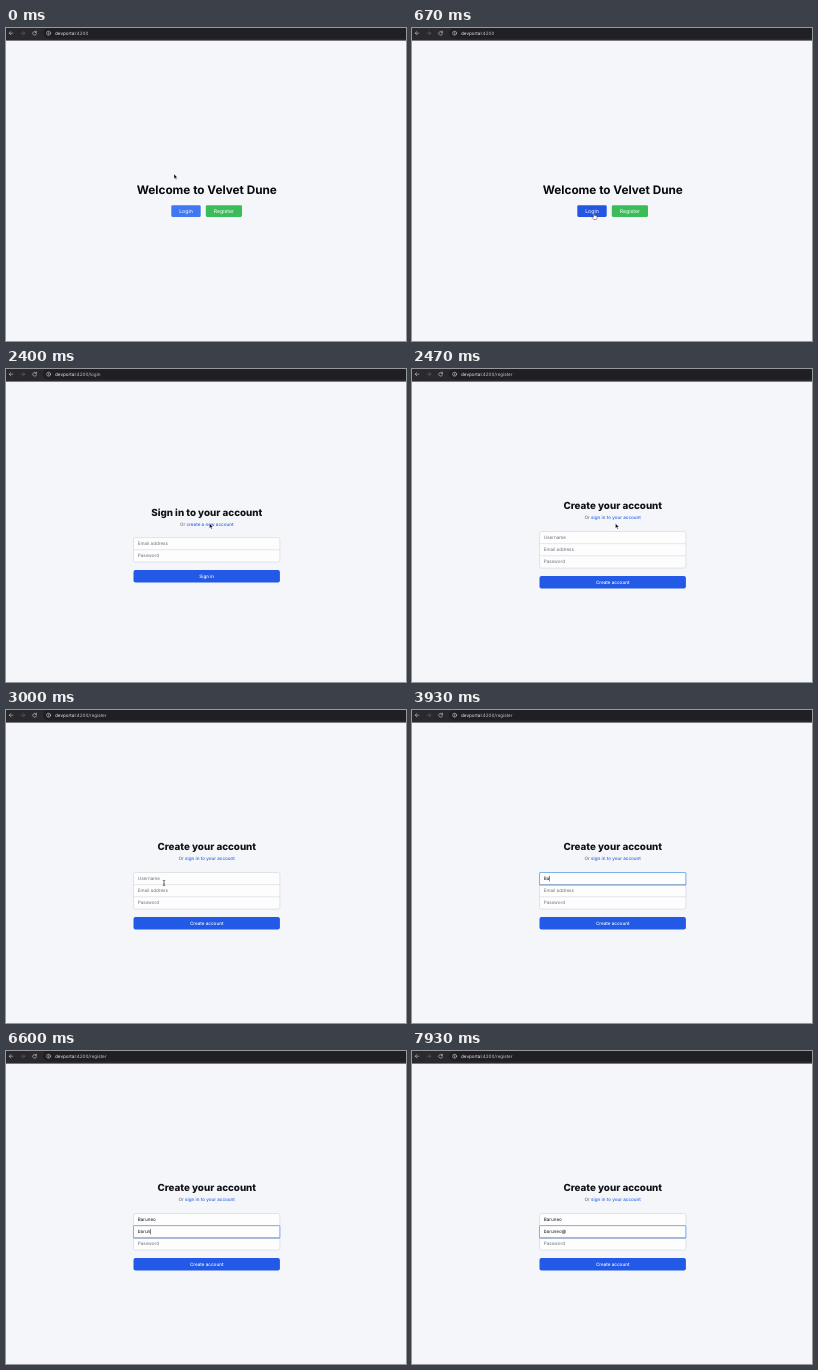
An HTML page for the animation above (8 s loop, 400 px wide and 313 px high).

```html
<!DOCTYPE html>
<html lang="en">
<head>
<meta charset="utf-8">
<title>Sign up flow</title>
<style>
html, body { margin: 0; width: 100%; height: 100%; overflow: hidden; background: #f4f6fa; }
svg { display: block; width: 100%; height: 100%; }
text { font-family: Inter, "Open Sans", sans-serif; font-size: 4.58px; text-rendering: geometricPrecision; }
.mid { text-anchor: middle; }
.hero { font-size: 11.77px; font-weight: 700; fill: #08090c; }
.title { font-size: 9.81px; font-weight: 800; fill: #111216; }
.note { fill: #4b5563; }
.link { fill: #2b62e6; font-weight: 500; }
.label { fill: #fff; font-weight: 500; }
.big { font-size: 5.23px; font-weight: 400; }
.hint { fill: #6b7077; }
.typed { fill: #111318; }
.icon { fill: none; stroke-width: .6; stroke-linecap: round; stroke-linejoin: round; }
</style>
</head>
<body>
<svg id="stage" viewBox="0 0 400 313" preserveAspectRatio="none">
  <rect width="400" height="313" fill="#f4f6fa"/>
  <g id="home"></g>
  <g id="login"></g>
  <g id="register"></g>
  <g id="bar">
    <rect width="400" height="12.6" fill="#2a292e"/>
    <rect x="37" y="-.6" width="380" height="11.2" rx="5.6" fill="#201f24"/>
    <path class="icon" stroke="#c9c9cd" d="M6.9 5.2H3.2M4.9 3.5L3.2 5.2L4.9 6.9"/>
    <path class="icon" stroke="#67676c" d="M15.1 5.2H18.8M17.1 3.5L18.8 5.2L17.1 6.9"/>
    <path class="icon" stroke="#c9c9cd" d="M30.2 4.2A1.9 1.9 0 1 0 30.5 5.7M30.4 3.1V4.4H29.1"/>
    <circle class="icon" cx="42.6" cy="5.2" r="2" stroke="#c9c9cd"/>
    <path class="icon" stroke="#c9c9cd" d="M42.6 5.1V6.2M42.6 4.1V4.2"/>
    <text x="49" y="6.9" fill="#f1f1f3">devportal<tspan id="path" fill="#c4c4c9"></tspan></text>
  </g>
  <g id="cursor">
    <path id="arrow" d="M0 0V4.8L1.15 3.75L1.95 5.6L2.75 5.25L1.95 3.45H3.5Z" fill="#080808" stroke="#fff" stroke-width=".35"/>
    <path id="hand" d="M-.6 .3Q0 -.5 .5 .3V2Q1.2 1.6 1.5 2.2Q2.2 1.9 2.5 2.5Q3.2 2.5 3.1 3.4Q3.1 4.9 2.3 6H-.3Q-1 4.9 -2 3.7Q-1.9 2.8 -.6 3.6Z" fill="#fff" stroke="#111" stroke-width=".4"/>
    <path id="beam" d="M-1.2 -2.6Q0 -2.6 0 -2Q0 -2.6 1.2 -2.6M0 -2V2M-1.2 2.6Q0 2.6 0 2Q0 2.6 1.2 2.6M-.6 .9H.6" fill="none" stroke="#222" stroke-width=".6"/>
  </g>
</svg>
<script>
const LOOP = 8000, CX = 200.75, LEFT = 127.5, WIDE = 146.4, ROW = 12.1, PAD = 131.75;
const $ = id => document.getElementById(id);

function add(parent, tag, attrs, content) {
  const el = document.createElementNS("http://www.w3.org/2000/svg", tag);
  for (const k in attrs) el.setAttribute(k, attrs[k]);
  if (content) el.textContent = content;
  parent.append(el);
  return el;
}
const show = (el, on) => el.setAttribute("visibility", on ? "visible" : "hidden");

function button(parent, x, y, w, h, r, fill, label, cls) {
  const box = add(parent, "rect", { x, y, width: w, height: h, rx: r, fill });
  add(parent, "text", { x: x + w / 2, y: y + h / 2 + (cls ? 1.9 : 1.65), class: "mid label " + (cls || "") }, label);
  return box;
}

function form(parent, top, title, link, hints, action) {
  add(parent, "text", { x: CX, y: top, class: "mid title" }, title);
  const note = add(parent, "text", { x: CX, y: top + 10, class: "mid note" }, "Or ");
  add(note, "tspan", { class: "link" }, link);
  const y0 = top + 22.1, h = hints.length * ROW + .3;
  add(parent, "rect", { x: LEFT, y: y0, width: WIDE, height: h, rx: 2, fill: "#fefdfe", stroke: "#cdd0d7", "stroke-width": .55 });
  const rows = hints.map((text, i) => {
    const y = y0 + i * ROW;
    if (i) add(parent, "path", { d: `M${LEFT} ${y + .1}h${WIDE}`, stroke: "#cdd0d7", "stroke-width": .55 });
    return { y, hint: add(parent, "text", { x: PAD, y: y + 7.75, class: "hint" }, text) };
  });
  button(parent, LEFT, y0 + h + 7.95, WIDE, 12.4, 2, "#2259e6", action);
  return rows;
}

const home = $("home"), login = $("login"), register = $("register");
add(home, "text", { x: CX, y: 166.3, class: "mid hero" }, "Welcome to Velvet Dune");
const loginBtn = button(home, 165.3, 177.3, 29.4, 11.6, 1.3, "#3f78f2", "Login", "big");
const joinBtn = button(home, 199.8, 177.3, 36.2, 11.6, 1.3, "#3abc59", "Register", "big");
form(login, 146.5, "Sign in to your account", "create a new account", ["Email address", "Password"], "Sign in");
const rows = form(register, 140.4, "Create your account", "sign in to your account",
  ["Username", "Email address", "Password"], "Create account");

const ring = add(register, "g", {});
add(ring, "rect", { x: LEFT, y: 0, width: WIDE, height: 12.4, rx: .6, fill: "none", stroke: "#5f9fee", "stroke-width": .75 });
add(ring, "path", { d: `M${LEFT} 12.4h${WIDE}`, stroke: "#8190a6", "stroke-width": .7 });
const caret = add(register, "rect", { width: .5, height: 5.4, fill: "#111" });

// Each field: text, focus start and end, time of each key
const fields = [
  { text: "Baruneo", from: 3200, to: 5000, keys: [3670, 3930, 4130, 4330, 4530, 4730, 4870] },
  { text: "baruneo@", from: 5000, to: 8000, keys: [5670, 5770, 5870, 6070, 6270, 6670, 6900, 7730] }
];
fields.forEach((f, i) => {
  f.row = rows[i];
  f.out = add(register, "text", { x: PAD, y: f.row.y + 7.75, class: "typed" });
});

// Pointer stops: time, x, y
const stops = [
  [70, 168, 146], [200, 142, 163], [330, 178, 183], [430, 210, 184], [600, 182, 185.5],
  [930, 182, 185.5], [1330, 192, 199], [1470, 192, 199], [1730, 208, 206], [2200, 203.5, 154.5],
  [2600, 203.5, 154.5], [3000, 158, 173], [3200, 156, 169]
];
function pointer(t) {
  let a = stops[0];
  for (const b of stops) {
    if (t < b[0]) {
      if (t <= a[0]) return [a[1], a[2]];
      const u = (t - a[0]) / (b[0] - a[0]), e = u * u * (3 - 2 * u);
      return [a[1] + (b[1] - a[1]) * e, a[2] + (b[2] - a[2]) * e];
    }
    a = b;
  }
  return [a[1], a[2]];
}
const inside = (x, y, l, t, r, b) => x > l && x < r && y > t && y < b;

function draw(t) {
  const page = t < 930 ? "home" : t < 2470 ? "login" : "register";
  for (const g of [home, login, register]) g.setAttribute("display", g.id === page ? "inline" : "none");
  $("path").textContent = ":4200" + { home: "", login: "/login", register: "/register" }[page];

  const [x, y] = pointer(t);
  const onLogin = page === "home" && inside(x, y, 165, 177, 195, 189);
  const onJoin = page === "home" && inside(x, y, 200, 177, 236, 189);
  loginBtn.setAttribute("fill", onLogin ? "#2456e2" : "#3f78f2");
  joinBtn.setAttribute("fill", onJoin ? "#2f9f4c" : "#3abc59");

  const onField = page === "login" ? inside(x, y, 127, 168.5, 274, 193)
    : page === "register" && inside(x, y, 127, 162.5, 274, 199);
  const onSubmit = page === "login" && inside(x, y, 127, 201, 274, 213.5);
  const shape = onField ? "beam" : onLogin || onJoin || onSubmit ? "hand" : "arrow";
  const seen = t < fields[0].keys[0];
  for (const id of ["arrow", "hand", "beam"]) show($(id), seen && id === shape);
  $("cursor").setAttribute("transform", `translate(${x} ${y})`);

  const active = page === "register" && fields.find(f => t >= f.from && t < f.to);
  ring.setAttribute("display", active ? "inline" : "none");
  caret.setAttribute("display", "none");
  for (const f of fields) {
    const n = f.keys.filter(k => t >= k).length;
    f.out.textContent = f.text.slice(0, n);
    show(f.out, n > 0);
    f.row.hint.setAttribute("display", n ? "none" : "inline");
    if (f !== active) continue;
    ring.setAttribute("transform", `translate(0 ${f.row.y})`);
    const since = t - (n ? f.keys[n - 1] : f.from);
    if (since % 1000 < 480 && t < 7900) {
      caret.setAttribute("display", "inline");
      caret.setAttribute("x", PAD + (n ? f.out.getComputedTextLength() : 0));
      caret.setAttribute("y", f.row.y + 3.4);
    }
  }
}

const start = performance.now();
function tick() {
  draw((performance.now() - start) % LOOP);
  requestAnimationFrame(tick);
}
tick();
</script>
</body>
</html>
```
